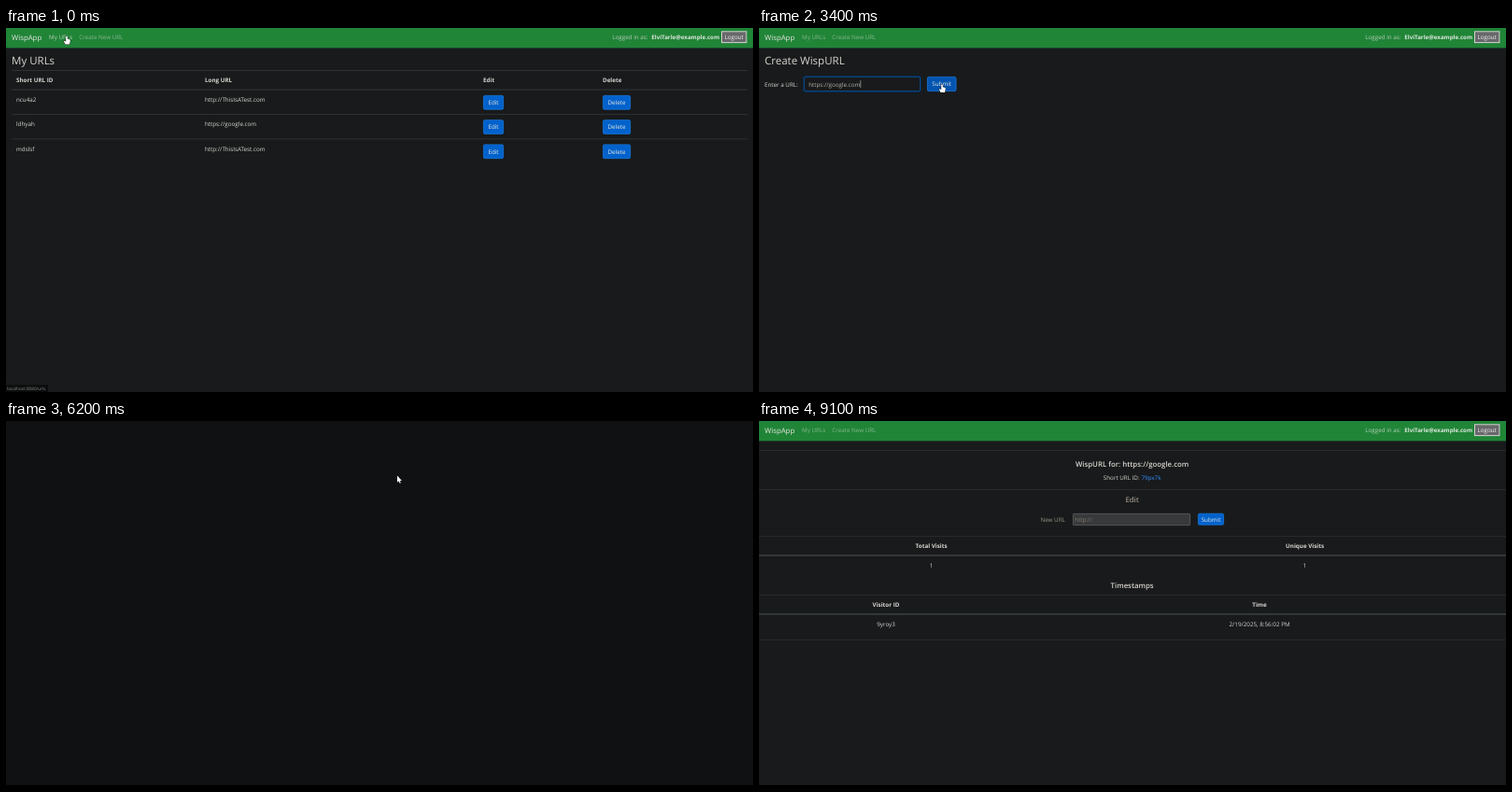
Animation of 800x391 px, one loop 9400 ms. Source, as an HTML page with a canvas:

```html
<!DOCTYPE html>
<html lang="en">
<head>
<meta charset="utf-8">
<title>URL shortener demo</title>
<style>
  html, body { margin: 0; width: 100%; height: 100%; overflow: hidden; background: #181a1b; }
  canvas { display: block; }
</style>
</head>
<body>
<canvas id="stage" width="800" height="391"></canvas>
<script>
const ctx = document.getElementById('stage').getContext('2d');
const LOOP = 9400, STEP = 100;
const BG = '#181a1b', TEXT = '#d8d5d0', MUTED = '#9a9288', BLUE = '#0062cc', RULE = '#34393b';
const NAV_DIM = 'rgba(232,230,227,.5)', NAV_LIT = 'rgba(232,230,227,.75)';
const BODY = 6.28, SUB = 7.8, HEAD = 11.5;
const TYPED = 'https://google.com';

function text(str, x, y, { size = BODY, weight = 400, color = TEXT, align = 'left' } = {}) {
  ctx.font = `${weight} ${size}px "Open Sans", "Noto Sans", sans-serif`;
  ctx.textRendering = 'geometricPrecision';
  ctx.textAlign = align;
  ctx.fillStyle = color;
  ctx.fillText(str, x, y);
  return ctx.measureText(str).width;
}

const centred = (str, x, y, style) => text(str, x, y, { align: 'center', ...style });

function rect(x, y, w, h, color) {
  ctx.fillStyle = color;
  ctx.fillRect(x, y, w, h);
}

const rule = (y, x = 0, w = 800, h = 0.8, color = RULE) => rect(x, y, w, h, color);

function box(x, y, w, h, fill, border, r = 1.5) {
  ctx.beginPath();
  ctx.roundRect(x + 0.4, y + 0.4, w - 0.8, h - 0.8, r);
  ctx.fillStyle = fill;
  ctx.fill();
  ctx.strokeStyle = border;
  ctx.lineWidth = 0.8;
  ctx.stroke();
}

function button(label, x, y, w, h, fill = BLUE) {
  box(x, y, w, h, fill, '#1a78dc');
  centred(label, x + w / 2, y + h / 2 + 2.4, { color: '#e8e6e3' });
}

function nav(hover) {
  rect(0, 0, 800, 21.4, '#208537');
  text('WispApp', 6, 12.8, { size: 7.8, color: '#e8e6e3' });
  text('My URLs', 46, 12.2, { color: hover === 'list' ? NAV_LIT : NAV_DIM });
  text('Create New URL', 78.3, 12.2, { color: hover === 'new' ? NAV_LIT : NAV_DIM });
  text('Logged in as:', 649.3, 12.2, { color: 'rgba(232,230,227,.75)' });
  text('ElviTarle@example.com', 764, 12.2, { size: 6.2, weight: 700, color: '#dce6dc', align: 'right' });
  rect(766, 3.3, 27.4, 12.8, '#d2d2d2');
  rect(767, 4.3, 25.4, 10.8, '#68686b');
  centred('Logout', 779.6, 12.2, { color: '#f2f2f2' });
}

function status(str) {
  if (!str) return;
  ctx.font = '400 4.7px "Open Sans", "Noto Sans", sans-serif';
  rect(0, 382.3, ctx.measureText(str).width + 3.5, 7.7, '#0b0c0d');
  text(str, 1, 388.2, { size: 4.7, color: '#8f8b85' });
}

function listPage() {
  text('My URLs', 6, 39.3, { size: HEAD, weight: 500 });
  const bold = { weight: 700 };
  text('Short URL ID', 11, 58.4, bold);
  text('Long URL', 213, 58.4, bold);
  text('Edit', 511, 58.4, bold);
  text('Delete', 639, 58.4, bold);
  rule(45, 6, 788);
  rule(65.6, 6, 788, 1);
  const rows = [['ncu4a2', 'http://ThisIsATest.com'], ['ldhyah', TYPED], ['mdslsf', 'http://ThisIsATest.com']];
  rows.forEach(([id, url], i) => {
    const y = 72 + i * 26.25;
    if (i) rule(y - 6, 6, 788);
    text(id, 11, y + 7.2);
    text(url, 213, y + 7.2);
    button('Edit', 511, y, 22, 15.6);
    button('Delete', 639, y, 30, 15.6);
  });
}

function createPage(t) {
  const focused = t >= 1300;
  text('Create WispURL', 6, 39.3, { size: HEAD, weight: 500 });
  text('Enter a URL:', 6, 62.6);
  if (focused) box(47, 51, 127, 18, '#0b2c50', '#0b2c50', 2.5);
  box(48, 52, 125, 16, BG, focused ? '#0a529f' : '#3d4346', 1.8);
  const count = t < 2100 ? Math.floor((t - 1600) / 125) + 1 : 4 + Math.floor((t - 2100) / 65);
  const typed = TYPED.slice(0, Math.max(0, Math.min(TYPED.length, count)));
  const width = text(typed, 53.2, 62.6, { color: '#b5afa6' });
  if (focused) rect(53.4 + width, 56.3, 0.6, 7.6, '#d0ccc6');
  button('Submit', 180, 52, 31.4, 16, t >= 3300 ? '#0054b0' : BLUE);
  if (typed && count <= 4) {
    rect(89.5, 71, 84.5, 33.5, '#1f2020');
    const style = { size: 5.05, weight: 600, color: '#e4e4e4' };
    text('http://ThisIsATest.com', 94, 82.8, style);
    text('http://somethingElse.com', 94, 97.8, style);
  }
}

function detailPage(visited) {
  const sub = { size: SUB, weight: 600 }, bold = { weight: 700 };
  const visits = visited ? '1' : '0', shift = visited ? 106 : 0;
  for (const y of [31, 73, 123, 186]) rule(y, 0, 800, 0.8, '#2c3032');
  rule(143.4, 0, 800, 1.2, '#444a4d');
  rule(206.3, 0, 800, 1.2, '#444a4d');
  rule(visited ? 234 : 214, 0, 800, 0.8, '#282c2d');
  centred('WispURL for: https://google.com', 399.6, 48.7, sub);
  text('Short URL ID:', 407.6, 63, { align: 'right' });
  text('79px7k', 409.4, 63, { color: '#3391ff' });
  centred('Edit', 399.6, 87.3, { ...sub, color: MUTED });
  text('New URL', 301.5, 108, { color: MUTED });
  box(336, 99, 126, 13, '#38393a', '#5d6163', 0.8);
  text('http://', 338.3, 108, { color: '#827b72' });
  button('Submit', 470, 98.8, 28, 12.8);
  centred('Total Visits', 184.6, 136.3, bold);
  centred('Unique Visits', 584.6, 136.3, bold);
  centred(visits, 184.6, 157.2);
  centred(visits, 584.6, 157.2);
  centred('Timestamps', 399.6, 179.4, sub);
  centred('Visitor ID', 242 - shift, 199.2, bold);
  centred('Time', 642 - shift, 199.2, bold);
  if (visited) {
    centred('9yroy3', 136, 219.9);
    centred('2/19/2025, 8:56:02 PM', 536, 219.9);
  }
}

// Pointer path: time, x, y of the hot spot
const PATH = [
  [0, 65, 8.5], [100, 65, 8.5], [700, 112, 10.5], [1000, 112, 11], [1300, 128, 59.5],
  [2800, 128, 59.5], [3300, 196, 60], [3500, 196, 60], [4400, 176.6, 79.6], [4500, 176.6, 79.6],
  [5300, 419, 58.5], [6200, 419, 58.5], [7100, 382, 164.5], [7700, 382, 164.5],
  [8500, 345, 250], [8700, 345, 250], [9100, 300, 262]
];

function pointer(t) {
  const i = Math.max(1, PATH.findIndex(p => p[0] >= t));
  const [a, b] = [PATH[i - 1], PATH[i]];
  const k = (t - a[0]) / (b[0] - a[0]), e = k * k * (3 - 2 * k);
  return [a[1] + (b[1] - a[1]) * e, a[2] + (b[2] - a[2]) * e];
}

const ARROW = new Path2D('M0 0V7.2L1.6 5.8 2.7 8.2 3.8 7.7 2.8 5.4H4.9Z');
const HAND = new Path2D('M-.8 .8Q0-.4 .8 .8V3.2L3 3.7Q4 4 3.8 5.4L3 9H-1.5L-3.3 5.6Q-3 4.5-.8 6Z');
const BEAM = new Path2D('M-1.3-3.5H1.3M0-3.5V3.5M-1.3 3.5H1.3');

function drawPointer(x, y, shape) {
  ctx.save();
  ctx.translate(x, y);
  if (shape === BEAM) {
    ctx.strokeStyle = '#d8d8d8';
    ctx.lineWidth = 0.8;
    ctx.stroke(shape);
  } else {
    ctx.strokeStyle = '#111';
    ctx.lineWidth = 0.9;
    ctx.stroke(shape);
    ctx.fillStyle = '#fff';
    ctx.fill(shape);
  }
  ctx.restore();
}

function draw(t) {
  const [x, y] = pointer(t);
  const blank = t >= 6200 && t < 7300;
  const onNav = t < 1100 && y < 20;
  const hover = onNav && x < 73 ? 'list' : onNav && x > 77 ? 'new' : '';
  const onLink = t >= 5300 && t < 6200;
  const inField = t >= 1300 && t < 3500 && x > 48 && x < 173;
  const onSubmit = t >= 2800 && t < 3500 && x > 180;

  rect(0, 0, 800, 391, blank ? '#101112' : BG);
  if (!blank) {
    nav(hover);
    if (t < 900) listPage();
    else if (t < 3500) createPage(t);
    else detailPage(t >= 7800);
    if (hover) status('localhost:8080/urls' + (hover === 'new' ? '/new' : ''));
    else if (onLink) status('localhost:8080/u/79px7k');
  }
  rect(0, 390, 800, 1, '#000');
  if (t < 9100) drawPointer(x, y, inField ? BEAM : hover || onLink || onSubmit ? HAND : ARROW);
}

const start = performance.now();
function frame() {
  const t = (performance.now() - start) % LOOP;
  draw(Math.floor(t / STEP) * STEP);
  requestAnimationFrame(frame);
}
frame();
</script>
</body>
</html>
```
